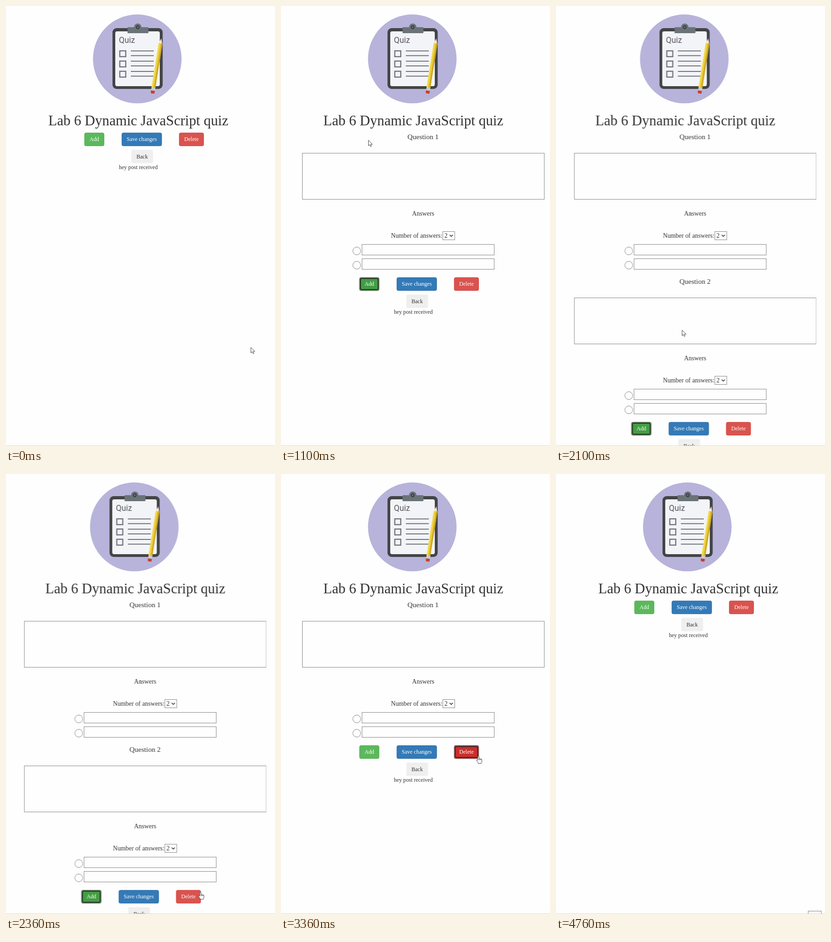
Animation of 586x955 px, one loop 4.84 s. Source, as an HTML page:

```html
<!DOCTYPE html>
<html lang="en">
<head>
<meta charset="utf-8">
<title>Quiz editor</title>
<style>
html, body { margin: 0; width: 100%; height: 100%; overflow: hidden; background: #fefefe; }
svg { display: block; width: 586px; height: 955px; }
text { font-family: "Liberation Serif", "Times New Roman", serif; font-kerning: none; fill: #333; text-anchor: middle; }
.title { font-size: 31.1px; }
.h4 { font-size: 15.55px; }
.body { font-size: 13.82px; }
.small, .btn text { font-size: 12.1px; }
.btn text { fill: #fff; }
.btn .dark { fill: #333; }
.field { fill: #fefefe; stroke: #858585; shape-rendering: crispEdges; }
.radio { fill: #fefefe; stroke: #767676; stroke-width: .9; }
.ring rect { fill: none; }
.add { fill: #5cb85c; stroke: #4cae4c; }
.save { fill: #337ab7; stroke: #2e6da4; }
.del { fill: #d9534f; stroke: #d43f3a; }

/* 4840 ms loop, every change is a hard step */
.page, .bar, .q1, .q2, .add, .del, .ring, .cursor, .arrow, .hand, .popup {
  animation: 4840ms step-end infinite;
}
.page { animation-name: page; }
.bar { animation-name: bar; }
.q1 { animation-name: q1; }
.q2 { animation-name: q2; }
.add { animation-name: add; }
.del { animation-name: del; }
.add-ring { animation-name: add-ring; }
.del-ring { animation-name: del-ring; }
.cursor { animation-name: cursor; }
.arrow { animation-name: arrow; }
.hand { animation-name: hand; }
.popup { animation-name: popup; }

@keyframes page {
  0%, 64.669%, 100% { transform: translateX(0); }
  38.429% { transform: translateX(-6.5px); }
}
@keyframes bar {
  0%, 80.578%, 100% { transform: translateY(0); }
  22.727%, 64.669% { transform: translateY(314px); }
  38.429% { transform: translateY(628px); }
}
@keyframes q1 {
  0%, 80.578%, 100% { opacity: 0; }
  22.727% { opacity: 1; }
}
@keyframes q2 {
  0%, 64.669%, 100% { opacity: 0; }
  38.429% { opacity: 1; }
}
@keyframes add {
  0%, 63.016%, 100% { fill: #5cb85c; stroke: #4cae4c; }
  11.363% { fill: #449d44; stroke: #398439; }
}
@keyframes del {
  0%, 96.694%, 100% { fill: #d9534f; stroke: #d43f3a; }
  50% { fill: #c9302c; stroke: #ac2925; }
}
@keyframes add-ring {
  0%, 63.016%, 100% { opacity: 0; }
  19.214% { opacity: 1; }
}
@keyframes del-ring {
  0%, 96.694%, 100% { opacity: 0; }
  63.016% { opacity: 1; }
}
@keyframes popup {
  0%, 100% { opacity: 0; }
  98.347% { opacity: 1; }
}
@keyframes cursor {
  0% { transform: translate(533px, 740.5px); }
  1.446% { transform: translate(533px, 740.5px); animation-timing-function: steps(4, jump-both); }
  6.611% { transform: translate(185px, 271px); }
  11.363% { transform: translate(185px, 271px); animation-timing-function: steps(2, jump-both); }
  14.462% { transform: translate(190px, 291px); }
  25.826% { transform: translate(190px, 291px); animation-timing-function: steps(6, jump-both); }
  35.33% { transform: translate(199.5px, 601px); }
  40.289% { transform: translate(199.5px, 601px); animation-timing-function: steps(5, jump-both); }
  48.76% { transform: translate(423.5px, 907px); animation-timing-function: steps(5); }
  56.405% { transform: translate(421px, 915px); }
  66.322% { transform: translate(421px, 915px); animation-timing-function: steps(2, jump-both); }
  69.421% { transform: translate(430px, 612px); animation-timing-function: steps(2); }
  72.52% { transform: translate(426px, 610px); }
  75.619% { transform: translate(425px, 609px); }
  80.578% { transform: translate(425px, 609px); animation-timing-function: steps(3, jump-both); }
  85.33%, 100% { transform: translate(555px, 975px); }
}
@keyframes hand {
  0%, 22.727%, 38.429%, 64.669%, 80.578%, 100% { opacity: 0; }
  11.363%, 35.33%, 48.76%, 69.421% { opacity: 1; }
}
@keyframes arrow {
  0%, 22.727%, 38.429%, 64.669%, 80.578%, 100% { opacity: 1; }
  11.363%, 35.33%, 48.76%, 69.421% { opacity: 0; }
}
</style>
</head>
<body>
<svg viewBox="0 0 586 955">
  <defs>
    <g id="question">
      <rect class="field" x="46.4" y="319.5" width="527" height="100"/>
      <text class="body" x="309.7" y="454.6">Answers</text>
      <text class="body" x="295.5" y="503.2">Number of answers:</text>
      <rect class="field" x="352.4" y="489.5" width="26" height="18"/>
      <text class="body" x="359.4" y="503.2">2</text>
      <path d="M367.5 496.8l3.4 3.4 3.4-3.4" fill="none" stroke="#222" stroke-width="1.5"/>
      <g id="answer">
        <circle class="radio" cx="165" cy="531.6" r="8.5"/>
        <rect class="field" x="176.4" y="517.5" width="288" height="23"/>
      </g>
      <use href="#answer" y="31"/>
    </g>
    <g id="row">
      <rect x="247.9" y="97.3" width="13" height="12.6"/>
      <path d="M272 97.5h50M272 107.8h50" stroke-width="2"/>
    </g>
  </defs>

  <g class="page">
    <g class="logo">
      <circle cx="286" cy="114.8" r="96.5" fill="#b7b3da"/>
      <rect x="232" y="48" width="109.3" height="132" rx="9" fill="#434446"/>
      <rect x="238" y="55" width="97" height="119" rx="4" fill="#f3f4f7"/>
      <g fill="#6a7378">
        <circle cx="287" cy="46" r="8"/>
        <rect x="264.8" y="46" width="45.4" height="13" rx="1"/>
      </g>
      <circle cx="287" cy="46" r="4.2" fill="#3b3d40"/>
      <circle cx="287" cy="46" r="2" fill="#6a7378"/>
      <text x="263.5" y="80" style="font: 17.6px Roboto, Inter, sans-serif; fill: #55585f">Quiz</text>
      <g fill="none" stroke="#70727b" stroke-width="2.4">
        <use href="#row"/>
        <use href="#row" y="22.2"/>
        <use href="#row" y="44.4"/>
      </g>
      <g transform="translate(338.3 70.5) rotate(9.1)">
        <path d="M0 0L4.2 12H-4.2Z" fill="#f7ead0"/>
        <path d="M-4.2 11.5L-2 9.5 0 11.5 2 9.5 4.2 11.5V109H-4.2Z" fill="#ecd03a"/>
        <path d="M1 10.5L2 9.5 4.2 11.5V109H1Z" fill="#cfa725"/>
        <path d="M-4.2 11.5L-2.6 10V109H-4.2Z" fill="#f6e36a"/>
        <rect x="-4.2" y="108" width="8.4" height="7" fill="#c9ccd0"/>
        <path d="M-4.2 114.5H4.2V119q0 2-2 2H-2.2q-2 0-2-2Z" fill="#c9402f"/>
      </g>
    </g>
    <text class="title" x="288.2" y="259.2">Lab 6 Dynamic JavaScript quiz</text>

    <g class="q1">
      <text class="h4" x="309.5" y="288.8">Question 1</text>
      <use href="#question"/>
    </g>
    <g class="q2">
      <text class="h4" x="309.5" y="602.8">Question 2</text>
      <use href="#question" y="314"/>
    </g>

    <g class="bar">
      <g class="btn">
        <rect class="add" x="171.1" y="275.4" width="42.5" height="28.2" rx="3.2"/>
        <g class="ring add-ring">
          <rect x="171.1" y="275.4" width="42.5" height="28.2" rx="3.2" stroke="#255625"/>
          <rect x="172" y="276.3" width="40.7" height="26.4" rx="2.4" stroke="#fff" stroke-width=".8"/>
          <rect x="173.1" y="277.4" width="38.5" height="24.2" rx="1.6" stroke="#101010" stroke-width="1.7"/>
        </g>
        <text x="192.4" y="293.3">Add</text>
      </g>
      <g class="btn">
        <rect class="save" x="252.4" y="275.4" width="86.7" height="28.2" rx="3.2"/>
        <text x="295.7" y="293.3">Save changes</text>
      </g>
      <g class="btn">
        <rect class="del" x="377.4" y="275.4" width="53.2" height="28.2" rx="3.2"/>
        <g class="ring del-ring">
          <rect x="377.4" y="275.4" width="53.2" height="28.2" rx="3.2" stroke="#761c19"/>
          <rect x="378.3" y="276.3" width="51.4" height="26.4" rx="2.4" stroke="#fff" stroke-width=".8"/>
          <rect x="379.4" y="277.4" width="49.2" height="24.2" rx="1.6" stroke="#101010" stroke-width="1.7"/>
        </g>
        <text x="404" y="293.3">Delete</text>
      </g>
      <g class="btn">
        <rect x="273" y="312.2" width="47.3" height="29" rx="3.4" fill="#efefef"/>
        <text class="dark" x="296.6" y="331">Back</text>
      </g>
      <text class="small" x="288.2" y="353.6">hey post received</text>
    </g>
  </g>

  <rect class="popup" x="549.5" y="948.7" width="28.5" height="12" fill="#fff" stroke="#999" stroke-width="1.3"/>
  <rect y="954" width="586" height="1" fill="#d8d8da"/>

  <g class="cursor" fill="#fff" stroke="#333" stroke-width=".9" stroke-linejoin="round">
    <path class="arrow" d="M.5.5V12.4L3.2 9.9 5.1 14.1 7.1 13.2 5.3 9.2H9.2Z"/>
    <path class="hand" d="M-1.3 9.5V1.6Q-1.3.5 0 .5T1.3 1.6V6Q2.4 5 3.6 6.3 4.8 5.5 5.8 6.9 7.6 6.3 7.6 8.6V12Q7.6 13.4 6.4 14.4V16.2H-.4V14.8L-3.8 10.4Q-4.5 9.2-3.5 8.6-2.5 8.2-1.3 9.5ZM1.3 6V9M3.6 6.3V9M5.8 6.9V9"/>
  </g>
</svg>
</body>
</html>
```
